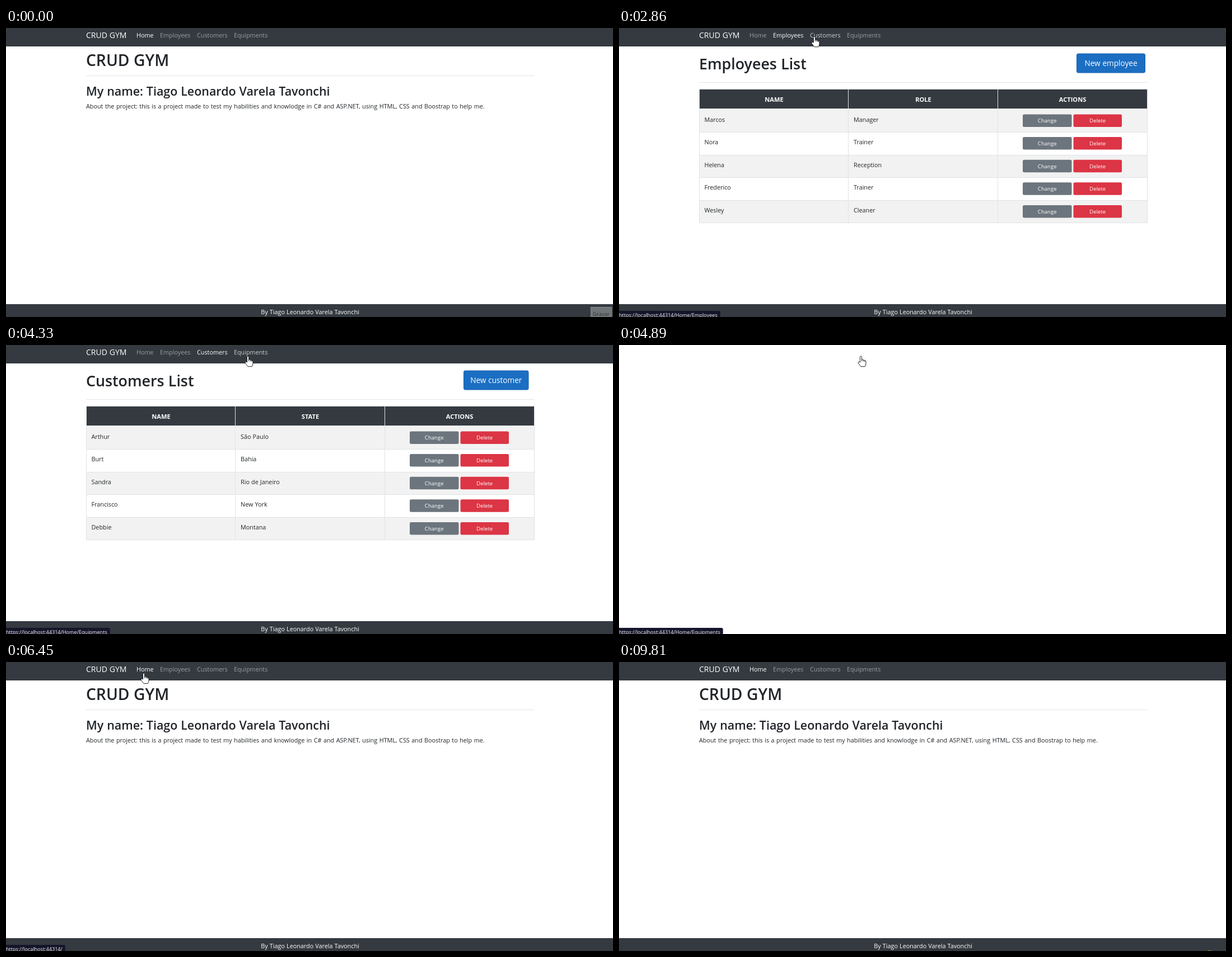
These frames come from a looping animation (1084x517 px, 9880 ms). An HTML page:

```html
<!DOCTYPE html>
<html lang="en">
<head>
<meta charset="utf-8">
<title>CRUD GYM</title>
<style>
  html, body { margin: 0; width: 100%; height: 100%; overflow: hidden; background: #fff; }
  svg { display: block; width: 1084px; height: 517px; cursor: default; }
  text { font: 10.8px "Open Sans", "Noto Sans", sans-serif; word-spacing: .3px; fill: #212529; }
  .bar { fill: #343a40; }
  .bar-text, .btn text, .head { fill: #fff; }
  .brand { font-size: 14px; fill: #fff; }
  .link { fill: #fff; fill-opacity: .5; }
  .link.hover { fill-opacity: .75; }
  .link.active { fill-opacity: 1; }
  .title { font-size: 26.8px; font-weight: 600; }
  .hero { font-size: 28.2px; }
  .name { font-size: 21.45px; font-weight: 600; }
  .about { word-spacing: .7px; }
  .mid { text-anchor: middle; }
  .head { font-size: 11.1px; font-weight: 700; }
  .rule { stroke: #e5e5e5; }
  .grid { stroke: #dee2e6; fill: none; }
  .odd { fill: #f2f2f2; }
  .new rect { fill: #1b6ec2; stroke: #1861ac; }
  .new text { font-size: 13.6px; }
  .small text { font-size: 9.6px; }
  .change rect { fill: #6c757d; }
  .delete rect { fill: #dc3545; }
  .status rect { fill: #15152a; }
  .status text { font-size: 9.1px; word-spacing: 0; fill: #f2f2f2; }
  .recorder rect { fill: #6f7577; stroke: #858a8c; }
  .recorder text { font-size: 9.6px; fill: #2c3135; }
  .pointer path { fill: #fff; stroke: #111; stroke-width: .9; stroke-linejoin: round; }
  .pointer .thin { fill: none; }
</style>
</head>
<body>
<svg viewBox="0 0 1084 517">
  <g id="site"></g>
  <g id="recorder" class="recorder">
    <rect x="1044.5" y="499.5" width="37" height="20"/>
    <text class="mid" x="1063" y="515">Gravar</text>
  </g>
  <g id="status" class="status">
    <rect x="-4" y="506" height="20" rx="3"/>
    <text x="0" y="517.4"></text>
  </g>
  <circle id="glow" cx="1054.5" cy="525" r="9" fill="#a8a522"/>
  <g id="pointer" class="pointer">
    <path data-kind="arrow" d="M.5 .5V13.6L3.4 10.9L5.3 15.3L7.3 14.4L5.4 10.2H9.5Z"/>
    <g data-kind="hand">
      <path d="M-1.5 11V1.4Q-1.5 0 0 0T1.5 1.4V6Q4 5.4 4.3 7Q6.5 6.3 6.8 8Q9 7.5 9 9.5V13Q9 16 7.2 18.6H0Q-2 16 -5 12Q-5.3 10 -3.6 10Q-2.5 10.2 -1.5 11Z"/>
      <path class="thin" d="M1.5 6V9M4.3 7V9.5M6.8 8V10"/>
    </g>
    <path data-kind="beam" class="thin" d="M-2.5 -6H-.7L0 -5.5L.7 -6H2.5M0 -5.5V5.5M-2.5 6H-.7L0 5.5L.7 6H2.5"/>
  </g>
</svg>
<script>
const LOOP = 9880;
const OWNER = 'Tiago Leonardo Varela Tavonchi';
const $ = id => document.getElementById(id);

// x: left edge of the label, rest: where the pointer stops on it.
const LINKS = {
  Home: { x: 233, rest: [246, 20] },
  Employees: { x: 275, rest: [299, 17] },
  Customers: { x: 341, rest: [356, 15] },
  Equipments: { x: 407, rest: [432, 20] }
};

const text = (x, y, cls, s) => `<text x="${x}" y="${y}" class="${cls}">${s}</text>`;
const rect = (x, y, w, h, cls) => `<rect x="${x}" y="${y}" width="${w}" height="${h}" class="${cls}"/>`;
const rule = y => `<path class="rule" d="M143 ${y}H943.5"/>`;
const button = (cls, x, y, w, h, base, label) =>
  `<g class="btn ${cls}"><rect x="${x}" y="${y}" width="${w}" height="${h}" rx="2.5"/>` +
  text(x + w / 2, base, 'mid', label) + '</g>';

function listPage(title, item, width, column, rows) {
  const pitch = 40.6;
  let out = text(143, 74, 'title', title + ' List') + rule(97.5) +
    button('new', 817.5, 46, width, 34, 68, 'New ' + item) +
    rect(143, 110, 801, 34.5, 'bar');
  let lines = 'M143.5 109.5H943.5V348.5H143.5ZM409.5 110V348M676.5 110V348';
  rows.forEach(([name, value], i) => {
    const dy = i * pitch, top = i ? Math.round(145.4 + dy) : 144;
    if (i % 2 === 0) out += rect(143, top, 801, Math.round(186 + dy) - top, 'odd');
    lines += `M143 ${top + .5}H944`;
    out += text(152.5, 167.6 + dy, '', name) + text(419, 167.6 + dy, '', value) +
      button('small change', 721, 154.5 + dy, 87.5, 22.5, 169.4 + dy, 'Change') +
      button('small delete', 811.5, 154.5 + dy, 86.5, 22.5, 169.4 + dy, 'Delete');
  });
  out += `<path class="grid" d="${lines}"/>`;
  ['NAME', column, 'ACTIONS'].forEach((s, i) => out += text(277 + i * 266.5, 131.5, 'head mid', s));
  return out;
}

const pages = {
  Home: text(143, 68, 'title hero', 'CRUD GYM') + rule(85.5) +
    text(143, 121, 'name', 'My name: ' + OWNER) +
    text(143, 144, 'about', 'About the project: this is a project made to test my habilities and knowlodge ' +
      'in C# and ASP.NET, using HTML, CSS and Boostrap to help me.'),
  Employees: listPage('Employees', 'employee', 122, 'ROLE', [
    ['Marcos', 'Manager'], ['Nora', 'Trainer'], ['Helena', 'Reception'],
    ['Frederico', 'Trainer'], ['Wesley', 'Cleaner']]),
  Customers: listPage('Customers', 'customer', 115.5, 'STATE', [
    ['Arthur', 'São Paulo'], ['Burt', 'Bahia'], ['Sandra', 'Rio de Janeiro'],
    ['Francisco', 'New York'], ['Debbie', 'Montana']]),
  Equipments: listPage('Equipments', 'equipment', 125.5, 'PRICE', [
    ['Training Bench', 125], ['Treadmill', 100], ['Barbell Set', 97],
    ['Rowing Machine', 84], ['Dumbbell Set', 33]])
};

$('site').innerHTML =
  rect(0, 0, 1084, 33, 'bar') + text(143, 18.2, 'brand', 'CRUD GYM') +
  Object.entries(LINKS).map(([s, { x }]) => text(x, 17, 'link', s)).join('') +
  Object.entries(pages).map(([s, body]) => `<g data-page="${s}">${body}</g>`).join('') +
  rect(0, 494, 1084, 24, 'bar') + text(543, 512, 'bar-text mid', 'By ' + OWNER);

const links = [...document.querySelectorAll('.link')];
const views = document.querySelectorAll('[data-page]');
const kinds = document.querySelectorAll('[data-kind]');
const [statusBox, statusText] = $('status').children;
links.forEach(l => LINKS[l.textContent].width = l.getComputedTextLength());

const smooth = k => k * k * (3 - 2 * k);
const glide = k => 1 - (1 - k) ** 2.29;

// The pointer enters from below, leaves over the top, visits the links and drops out.
const ENTRY = [1060, 520];
const moves = [
  { from: 70, to: 470, end: [48, -20] },
  { from: 470, to: 870, end: [86, -20] },
  { from: 870, to: 1840, end: LINKS.Employees.rest },
  { from: 2400, to: 2990, end: LINKS.Customers.rest },
  { from: 3740, to: 4200, end: LINKS.Equipments.rest },
  { from: 5040, to: 5740, end: LINKS.Home.rest, bow: 40 },
  { from: 6660, to: 8950, end: [1015, 519], bow: -50, ease: glide }
];

// Page on show from each time; an empty name is the white flash of a load.
const loads = [[0, 'Home'], [2310, 'Employees'], [3460, ''], [3600, 'Customers'],
  [4830, ''], [4970, 'Equipments'], [6450, 'Home']];
const CLICK = 140;

const pageAt = t => loads.findLast(l => l[0] <= t)[1];

function pointerAt(t) {
  let [x, y] = ENTRY;
  for (const { from, to, end, bow = 0, ease = smooth } of moves) {
    if (t < from) break;
    const k = ease(Math.min(1, (t - from) / (to - from)));
    x += (end[0] - x) * k;
    y += (end[1] - y) * k + 4 * bow * k * (1 - k);
  }
  return [x, y];
}

function hoverAt(t) {
  const [px, py] = pointerAt(t), pad = 5.8;
  if (py < 0 || py > 30) return '';
  return Object.keys(LINKS).find(s => {
    const { x, width } = LINKS[s];
    return px >= x - pad && px < x + width + pad;
  }) || '';
}

function kindAt(t, page, hover) {
  const [x, y] = pointerAt(t);
  const loading = page && pageAt(t + CLICK) !== page;
  if (hover) return loading ? 'arrow' : 'hand';
  const onTitle = x > 143 && x < 350 && y > 34 && y < 90;
  return onTitle ? 'beam' : 'arrow';
}

// The address bubble follows the hovered link late and fades once it is left.
function drawStatus(t) {
  const lag = 300, fade = 150;
  let age = 0, link;
  while (!(link = hoverAt(t - lag - age)) && age < fade) age += 10;
  $('status').style.opacity = link ? 1 - age / fade : 0;
  if (!link) return;
  statusText.textContent = 'https://localhost:44314/' + (link === 'Home' ? '' : 'Home/' + link);
  statusBox.setAttribute('width', statusText.getComputedTextLength() + 9);
}

const show = (el, on) => el.style.display = on ? '' : 'none';

function render(t) {
  const page = pageAt(t), hover = hoverAt(t), kind = kindAt(t, page, hover);
  show($('site'), page);
  views.forEach(v => show(v, v.dataset.page === page));
  links.forEach(l => {
    l.classList.toggle('active', l.textContent === page);
    l.classList.toggle('hover', l.textContent === hover);
  });
  drawStatus(t);
  kinds.forEach(k => show(k, k.dataset.kind === kind));
  $('pointer').setAttribute('transform', `translate(${pointerAt(t)})`);
  show($('recorder'), t < 70);
  show($('glow'), t >= LOOP - 70);
}

let start;
function tick(now) {
  start ??= now;
  render((now - start) % LOOP);
  requestAnimationFrame(tick);
}
render(0);
requestAnimationFrame(tick);
</script>
</body>
</html>
```
